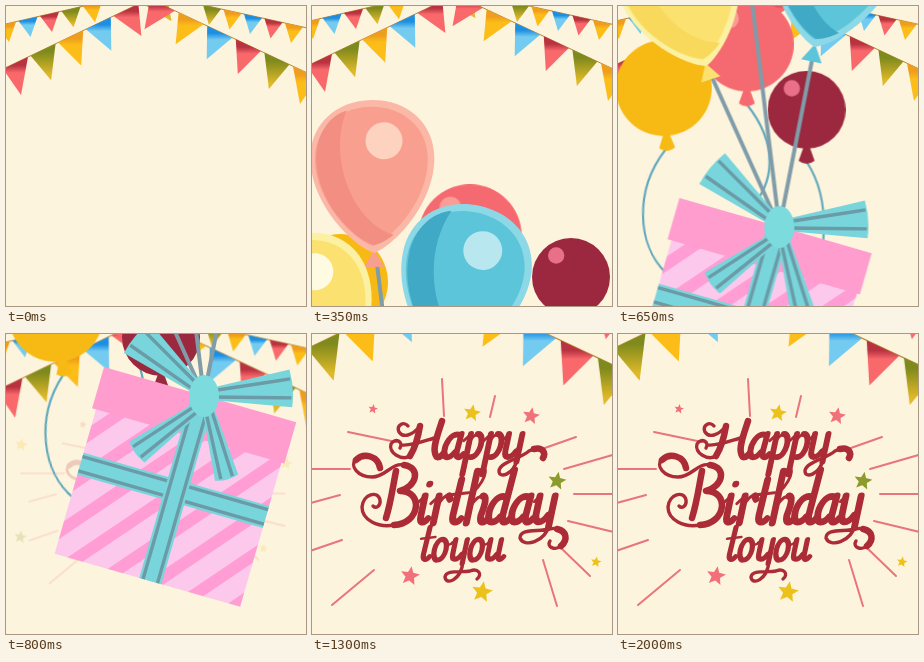
An HTML page that plays this animation: 300 px wide and 300 px high, repeating every 2.1 s.

```html
<!DOCTYPE html>
<html lang="en">
<head>
<meta charset="utf-8">
<title>Happy Birthday to you</title>
<style>
  html, body { margin: 0; width: 100%; height: 100%; overflow: hidden; background: #fdf4dd; }
  svg { display: block; width: 100vw; height: 100vh; }
  .anim { animation: 2.1s infinite both; }

  .bunting { animation-name: bunting; --x: -37px; --y: -50px; }
  .right { --x: -40px; --y: -37px; }
  @keyframes bunting {
    0% { transform: translate(0, 0); animation-timing-function: steps(7); }
    16.66%, 33.33% { transform: translate(-2px, -3px) scale(1); animation-timing-function: steps(6); }
    47.61% { transform: translate(calc(var(--x) * .42), calc(var(--y) * .42)) scale(1.126); animation-timing-function: steps(6); }
    61.9%, 100% { transform: translate(var(--x), var(--y)) scale(1.3); }
  }

  #greeting { animation-name: greeting; transform-origin: 144px 157px; }
  @keyframes greeting {
    0%, 33.33% { opacity: 0; transform: scale(.78); animation-timing-function: steps(2); }
    38.09% { opacity: .2; transform: scale(.81); animation-timing-function: steps(4); }
    47.61% { opacity: 1; transform: scale(.88); animation-timing-function: steps(6); }
    61.9%, 100% { opacity: 1; transform: scale(1); }
  }

  #red { animation-name: red; }
  @keyframes red {
    0% { transform: translate(193px, 440px) scale(1.15); animation-timing-function: steps(7); }
    16.66% { transform: translate(158px, 230px) scale(1.1); animation-timing-function: steps(4); }
    26.19% { transform: translate(138px, 104px); animation-timing-function: steps(5); }
    38.09% { transform: translate(115px, -60px); animation-timing-function: steps(4); }
    47.61%, 100% { transform: translate(90px, -260px); }
  }
  #maroon { animation-name: maroon; }
  @keyframes maroon {
    0% { transform: translate(343px, 446px); animation-timing-function: steps(7); }
    16.66% { transform: translate(259px, 271px); animation-timing-function: steps(4); }
    26.19% { transform: translate(211px, 171px); animation-timing-function: steps(5); }
    38.09% { transform: translate(155px, 3px); animation-timing-function: steps(4); }
    47.61% { transform: translate(110px, -115px); animation-timing-function: steps(4); }
    57.13%, 100% { transform: translate(85px, -250px); }
  }
  #amber { animation-name: amber; }
  @keyframes amber {
    0% { transform: translate(2px, 490px); animation-timing-function: steps(7); }
    16.66% { transform: translate(28px, 276px); animation-timing-function: steps(4); }
    26.19% { transform: translate(43px, 150px); animation-timing-function: steps(5); }
    38.09% { transform: translate(50px, -20px) rotate(-8deg); animation-timing-function: steps(4); }
    47.61% { transform: translate(58px, -149px) rotate(-8deg); animation-timing-function: steps(4); }
    57.13%, 100% { transform: translate(66px, -280px) rotate(-8deg); }
  }

  #parcel { animation-name: parcel; }
  @keyframes parcel {
    0% { transform: translate(-95px, 578px); animation-timing-function: steps(7); }
    16.66% { transform: translate(-38px, 210px); animation-timing-function: steps(4); }
    26.19% { transform: translate(0, 0); animation-timing-function: steps(5); }
    38.09% { transform: translate(61px, -265px); animation-timing-function: steps(4); }
    47.61% { transform: translate(122px, -474px); animation-timing-function: steps(3); }
    54.76%, 100% { transform: translate(165px, -630px); }
  }

  .ink { fill: none; stroke: #ab2b37; stroke-linecap: round; stroke-linejoin: round; }
  .ray { stroke: #e8747c; stroke-width: 2; stroke-linecap: round; }
  .thread { fill: none; stroke: #62a9bd; stroke-width: 2.2; stroke-linecap: round; }
  .cord { stroke: #7f9ca8; stroke-width: 4; }
  .edge { fill: none; stroke: #6b9ba6; stroke-width: 3.4; }
  .silk { fill: #78d5db; }
</style>
</head>
<body>
<svg viewBox="0 0 300 300" role="img" aria-label="Happy Birthday to you">
  <defs id="defs">
    <pattern id="candy" width="32" height="32" patternUnits="userSpaceOnUse" patternTransform="translate(4 10) rotate(-50)">
      <rect width="32" height="32" fill="#fcc8ec"/>
      <rect width="32" height="12" fill="#ff9dd4"/>
    </pattern>
  </defs>
  <g id="leftFlags" class="anim bunting"></g>
  <g transform="translate(300) scale(-1 1)"><g id="rightFlags" class="anim bunting right"></g></g>
  <g id="greeting" class="anim"></g>
  <g id="red" class="anim"></g>
  <g id="maroon" class="anim"></g>
  <g id="amber" class="anim"></g>
  <g id="parcel" class="anim">
    <path class="cord" d="M69 176L137 327M103 48L137 327M170 158L137 327"/>
    <g id="balloons"></g>
    <g transform="translate(-61 265)">
      <g transform="translate(98 33) rotate(16)">
        <path fill="url(#candy)" d="M4 38H197V193H4Z"/>
        <path fill="#ff9dcf" d="M0 0H200V43H0Z"/>
        <path class="silk" d="M4 88H197V111H4Z"/>
        <path class="edge" d="M4 92H197M4 107H197"/>
        <path class="silk" d="M92 0H115V193H92Z"/>
        <path class="edge" d="M96 0V193M111 0V193"/>
      </g>
      <g id="bow"></g>
      <ellipse cx="198" cy="62" rx="15" ry="21" fill="#7bdbdd"/>
    </g>
  </g>
</svg>
<script>
  const $ = id => document.getElementById(id);
  const add = (id, markup) => $(id).insertAdjacentHTML('beforeend', markup);

  // Flags: [shaded top, body]
  const cloth = {
    r: ['#b8323f', '#f9696c'], o: ['#7f8a1c', '#e0b92a'],
    y: ['#ee9d1c', '#fcbd18'], b: ['#1c8fe2', '#74cbf0']
  };
  for (const [k, [top, body]] of Object.entries(cloth))
    add('defs', `<linearGradient id="cloth-${k}" x2="0" y2="1"><stop offset=".22" stop-color="${top}"/>
      <stop offset="${k === 'o' ? .85 : .42}" stop-color="${body}"/></linearGradient>`);

  function flags(id, colors, x0, y0, step, width, slope, tip) {
    const last = colors.length * step;
    let out = `<path d="M${x0 - 20} ${y0 + 20 * slope}L${x0 + last} ${y0 - last * slope}" stroke="#b98634"/>`;
    [...colors].forEach((c, i) => {
      const x = x0 + i * step, y = y0 - i * step * slope, [tx, ty] = tip(i);
      out += `<path fill="url(#cloth-${c})" d="M${x} ${y}l${width} ${-width * slope}L${x + tx} ${y + ty}Z"/>`;
    });
    add(id, out);
  }
  const bigTip = i => [18 + 2.5 * i, 26 - 1.5 * i];
  const smallTip = () => [12, 16];
  flags('leftFlags', 'ybroy', -9, 20, 21.5, 19, .23, smallTip);
  flags('leftFlags', 'roybro', -3, 63, 27.6, 25, .48, bigTip);
  flags('rightFlags', 'yrbyo', 3, 21, 20.5, 18, .22, smallTip);
  flags('rightFlags', 'yorbyr', -12, 72, 28.6, 25, .47, bigTip);

  // Rays and stars
  const rays = [
    [130, 45, 132, 82], [183, 62, 178, 83], [36, 98, 84, 108], [-15, 135, 38, 135],
    [-5, 170, 28, 161], [264, 103, 230, 115], [304, 120, 252, 135], [262, 160, 310, 160],
    [256, 187, 310, 200], [248, 213, 278, 242], [231, 226, 245, 272], [62, 236, 20, 271], [30, 206, -5, 218]
  ];
  for (const [a, b, c, d] of rays) add('greeting', `<path class="ray" d="M${a} ${b}L${c} ${d}"/>`);

  function star(x, y, r, fill) {
    let pts = '';
    for (let i = 0; i < 10; i++) {
      const a = i * Math.PI / 5 - 1.4, q = i % 2 ? r * .45 : r;
      pts += `${x + q * Math.cos(a)},${y + q * Math.sin(a)} `;
    }
    add('greeting', `<polygon points="${pts}" fill="${fill}"/>`);
  }
  const pink = '#f2707a', gold = '#edc11c', olive = '#8d9a2c';
  star(61, 75, 5, pink);
  star(160, 79, 9, gold);
  star(219, 82, 9, pink);
  star(245, 147, 9.5, olive);
  star(98, 242, 10, pink);
  star(170, 258, 11, gold);
  star(284, 228, 5.5, gold);
  star(-15, 100, 8, gold);
  star(-16, 214, 8, olive);
  star(312, 123, 8, gold);

  // Brush lettering: [heavy strokes, light strokes], baseline at 0, x-height 25
  const bowl = 'M13-24C4-27 0-14 1-7C2 1 8 1 12-6';
  const foot = '-7C14 0 18 1 21-4';
  const cup = 'M3-25V-8C3 1 10 1 14-7';
  const glyphs = {
    a: [bowl + 'M15-25L14' + foot, 'M12-6L15-18'],
    d: [bowl + 'M16-49L14' + foot, 'M12-6L15-18'],
    p: ['M4-25V17M11-25C20-25 18 0 9-1', 'M-2-18L4-25M4-16C6-22 8-25 12-25M10-1C7-1 5-3 4-5'],
    y: [cup + 'M17-25V4', 'M14-7L17-14M-1-20L3-25'],
    i: ['M4-25V-7C4 0 8 1 11-4M6-36V-36', 'M-2-18L4-25'],
    r: ['M4-25V0M13-25L15-22', 'M-2-18L4-25M4-14C6-22 10-27 14-25'],
    t: ['M5-40L4-7C4 0 9 1 12-4', 'M-3-26L14-28'],
    h: ['M4-48V0M14-25C19-24 17-14 16-7C16 0 20 1 23-4', 'M4-14C8-24 12-26 15-24M4-46C12-58 16-42 4-28'],
    o: ['M10-25C-1-27-1 1 8 0C18 0 18-25 9-25', 'M14-21C17-17 20-19 22-22'],
    u: [cup + 'M16-25V-7C16 0 20 1 23-4', 'M14-7L16-14']
  };
  const ink = (d, w) => `<path class="ink" d="${d}" stroke-width="${w}"/>`;
  function write(word, xs, y, size, heavy) {
    [...word].forEach((ch, i) => add('greeting',
      `<g transform="translate(${xs[i]} ${y}) scale(${size}) skewX(-12)">
        ${ink(glyphs[ch][0], heavy)}${ink(glyphs[ch][1], 3)}</g>`));
  }
  const swash = (heavy, light) => add('greeting', ink(heavy, 6.5) + ink(light, 3.4));

  swash('M108 92C106 104 103 114 98 122M130 87C126 100 121 112 123 119C124 125 128 124 132 119',
        'M108 92C100 102 91 104 87 98C84 91 92 87 96 92M98 122C90 127 76 119 79 110C83 103 92 108 88 114M90 111C102 112 114 106 126 103');
  write('appy', [130, 150, 170, 189], 124, .96, 6.2);
  swash('M222 115C231 113 234 119 231 124',
        'M205 126C201 141 187 145 187 137C188 128 208 125 217 117C219 116 221 115 223 115');

  swash('M84 137C81 152 79 168 74 184M92 131C110 134 104 153 88 157C112 157 108 190 82 191M44 126C52 118 66 122 68 134',
        'M82 191C66 194 50 186 50 173C51 160 66 156 68 166C69 172 64 175 61 172M92 131C80 128 74 143 60 143C46 143 37 132 44 125');
  write('irthday', [103, 117, 135, 150, 174, 197, 219], 189, 1.08, 6.4);
  swash('M245 195C255 197 256 206 249 212',
        'M237 191C233 208 212 214 208 204C208 194 226 198 238 195C241 194 243 194 246 195M249 212C243 217 234 213 238 207');

  write('to', [107, 119], 226, .82, 6.4);
  write('you', [137, 155, 172], 226, .82, 6.4);
  swash('', 'M151 228C149 246 134 252 133 243C134 235 150 239 158 237C166 234 171 240 165 245');

  // Round balloons on loose threads
  function round(id, r, fill, shine, thread) {
    add(id, `<path class="thread" d="${thread}"/>
      <path fill="${fill}" d="M-3 ${r - 2}H3L8 ${r + 12}Q0 ${r + 18}-8 ${r + 12}Z"/>
      <circle r="${r}" fill="${fill}"/>
      <circle cx="${-.38 * r}" cy="${-.55 * r}" r="${.21 * r}" fill="${shine}"/>`);
  }
  round('red', 47, '#f56a70', '#fa9d97', 'M0 60C32 100 28 140 2 165');
  round('maroon', 39, '#9c2840', '#ea7089', 'M0 52C25 90 22 150 -3 193');
  round('amber', 48, '#f7ba14', '#f7ba14', 'M-2 62C-35 100 -36 155 -8 185');

  // Tall balloons, tip at the local origin
  const egg = 'M0 0C-22-8-62-50-62-95C-62-130-35-153 0-153C35-153 62-130 62-95C62-50 22-8 0 0Z';
  const shade = 'M0-8C-22-16-56-52-56-95C-56-120-42-138-25-143C-45-95-20-30 20-18C12-12 6-9 0-8Z';
  function tall(x, y, turn, size, rim, body, dark, shine) {
    add('balloons', `<g transform="translate(${x} ${y}) rotate(${turn}) scale(${size})">
      <path d="M0-3L10 14H-10Z" fill="${body}"/>
      <path d="${egg}" fill="${rim}"/>
      <path d="${egg}" fill="${body}" transform="translate(-1 -7) scale(.91)"/>
      <path d="${shade}" fill="${dark}"/>
      <circle cx="12" cy="-112" r="18.5" fill="${shine}"/></g>`);
  }
  tall(100, 37, -1, 1, '#fbb8a7', '#f99f8f', '#f28f82', '#fdd2bf');
  tall(64, 166, -18, 1, '#fcf0a2', '#fbe270', '#f8d95c', '#fffbe2');
  tall(172, 147, 12, 1.05, '#8cd8e6', '#5cc5da', '#3fa9c6', '#b8e7ef');

  // Bow: bands widening away from the knot
  function band(x, y, turn, len, w) {
    add('bow', `<g transform="translate(${x} ${y}) rotate(${turn})">
      <path class="silk" d="M0-6L${len} ${-w}Q${len + 4} 0 ${len} ${w}L0 6Z"/>
      <path class="edge" d="M0-3L${len} ${-w * .5}M0 3L${len} ${w * .5}"/></g>`);
  }
  band(190, 75, 144, 73, 13);
  band(203, 78, 75, 68, 12);
  band(192, 55, 220, 80, 20);
  band(205, 60, -4, 80, 19);
</script>
</body>
</html>
```
